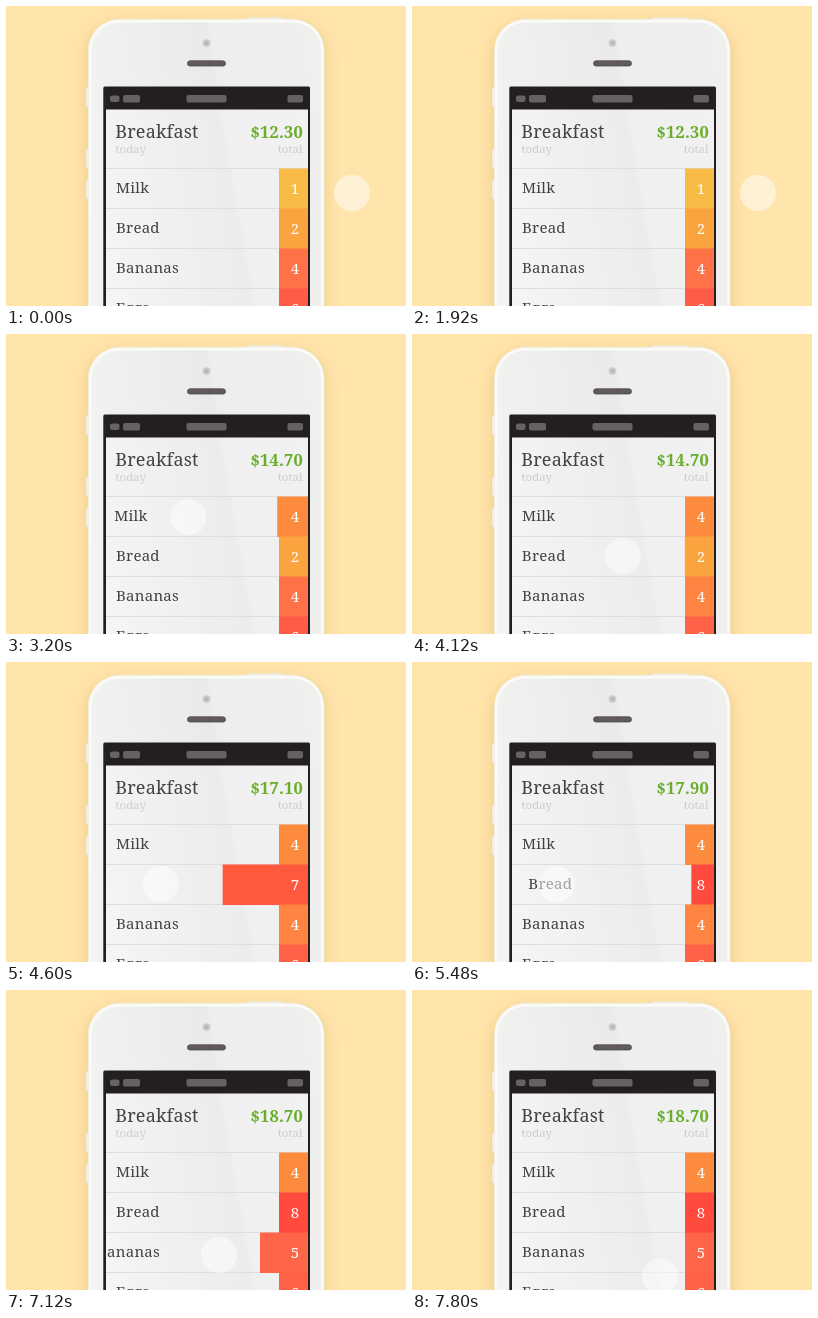
An HTML page for the animation above (8000 ms loop, 400 by 300 pixels).

```html
<!DOCTYPE html>
<html lang="en">
<head>
<meta charset="utf-8">
<title>Shopping list</title>
<style>
  html, body { margin: 0; width: 100%; height: 100%; overflow: hidden; background: #ffe4ab; }
  svg { display: block; width: 100vw; height: 100vh; }
  text { font-family: "Noto Serif", serif; font-size: 15px; letter-spacing: .25px; fill: #424242; }
  .title { font-size: 18px; letter-spacing: .15px; }
  .total { font-size: 16.5px; font-weight: 700; fill: #69ae2b; text-anchor: end; }
  .note { font-size: 11.5px; letter-spacing: 0; fill: #cdcdcd; }
  .count { fill: #fff; letter-spacing: 0; text-anchor: middle; }
</style>
</head>
<body>
<svg viewBox="0 0 400 300">
  <defs>
    <linearGradient id="shell" gradientUnits="userSpaceOnUse" x1="82" y1="190" x2="318" y2="149">
      <stop offset="0" stop-color="#f3f3f2"/>
      <stop offset=".6" stop-color="#eaeae9"/>
      <stop offset=".62" stop-color="#eeeeee"/>
      <stop offset="1" stop-color="#efefee"/>
    </linearGradient>
    <linearGradient id="page" gradientUnits="userSpaceOnUse" x1="100" y1="200" x2="302" y2="165">
      <stop offset="0" stop-color="#f4f4f4"/>
      <stop offset=".62" stop-color="#ececec"/>
      <stop offset=".64" stop-color="#f0f0f0"/>
      <stop offset="1" stop-color="#f1f1f1"/>
    </linearGradient>
    <filter id="blur" x="-20%" y="-20%" width="140%" height="140%"><feGaussianBlur stdDeviation="7"/></filter>
    <clipPath id="screen"><rect x="99.5" y="103" width="202.5" height="197"/></clipPath>
  </defs>

  <rect width="400" height="300" fill="#ffe4ab"/>
  <rect x="80" y="17" width="240" height="360" rx="32" fill="#d9ab5c" opacity=".4" filter="url(#blur)"/>
  <g fill="#f3f0ea" stroke="#e2dccf" stroke-width=".5">
    <rect x="80" y="81" width="5" height="20" rx="1.5"/>
    <rect x="80" y="143" width="5" height="19" rx="1.5"/>
    <rect x="80" y="174" width="5" height="19" rx="1.5"/>
    <rect x="240" y="11.5" width="37" height="5" rx="1.5"/>
  </g>
  <rect x="82.3" y="13.3" width="235.8" height="380" rx="31" fill="#fafaf8" stroke="#ece7dc" stroke-width=".6"/>
  <rect x="85.5" y="16.5" width="229.5" height="380" rx="28" fill="url(#shell)"/>
  <circle cx="200.5" cy="37" r="3.8" fill="#c9c9c9"/>
  <circle cx="200.5" cy="37" r="1.8" fill="#b5b5b8"/>
  <rect x="181.5" y="54.8" width="38" height="5.2" rx="2.6" fill="#615c5b" stroke="#4c4848" stroke-width=".8"/>

  <rect x="97.3" y="80.5" width="206.7" height="230" rx="1.5" fill="#231f20"/>
  <g fill="#676262">
    <rect x="104" y="89.5" width="9.5" height="6.5" rx="2"/>
    <rect x="117" y="89" width="17" height="7.5" rx="2"/>
    <rect x="180.5" y="89" width="40" height="7.5" rx="2"/>
    <rect x="281.5" y="89" width="15.5" height="7.5" rx="2"/>
  </g>
  <rect x="100" y="103.5" width="202" height="197" fill="url(#page)"/>
  <text class="title" x="109.3" y="132">Breakfast</text>
  <text class="note" x="109.5" y="147">today</text>
  <text class="total" id="total" x="297" y="132"></text>
  <text class="note" x="296.5" y="147" text-anchor="end">total</text>
  <g id="list" clip-path="url(#screen)"></g>
  <circle id="finger" r="18" fill="#fff" opacity=".5"/>
</svg>
<script>
const LOOP = 8000, ROW_TOP = 163, ROW_HEIGHT = 40, BAR_LEFT = 273, SCREEN_RIGHT = 302;
const UNIT_DRAG = 11, UNIT_PRICE = 0.8, START_TOTAL = 12.3;

// grab: finger x where the row starts to follow; down/up: touch times; free: units that cost nothing
const rows = [
  { name: "Milk", count: 1, from: [248, 187, 69], to: [253, 139, 62], grab: 218, down: 1880, up: 3120, free: 0 },
  { name: "Bread", count: 2, from: [251, 164, 63], to: [255, 74, 61], grab: 211, down: 4120, up: 5320, free: 2 },
  { name: "Bananas", count: 4, from: [255, 114, 72], drift: [255, 131, 65], to: [255, 101, 72], grab: 232, down: 6440, up: 7160, free: 0 },
  { name: "Eggs", count: 6, from: [255, 92, 72], drift: [255, 98, 71] },
];

const clamp = v => Math.min(1, Math.max(0, v));
const lerp = (a, b, p) => a + (b - a) * p;
const mix = (a, b, p) => a.map((v, i) => lerp(v, b[i], p));
const easeOut = p => 1 - (1 - p) ** 2;
const easeInOut = p => p < 0.5 ? 4 * p ** 3 : 1 - 4 * (1 - p) ** 3;

const moves = [
  { start: 1880, end: 2880, to: [182, 183], ease: easeInOut },
  { start: 3120, end: 3920, to: [211, 222], ease: easeInOut },
  { start: 4120, end: 4920, to: [144, 222], ease: easeOut },
  { start: 5400, end: 6000, to: [232, 264], ease: easeInOut },
  { start: 6440, end: 7040, to: [213, 265], ease: easeOut },
  { start: 7240, end: 7800, to: [248, 287], ease: easeInOut },
];

function fingerAt(t) {
  return moves.reduce((pos, m) =>
    mix(pos, m.to, m.ease(clamp((t - m.start) / (m.end - m.start)))), [346, 187]);
}

const pulled = (row, t) => Math.max(0, row.grab - fingerAt(t)[0]);
const unitsAt = (row, t) => Math.floor(pulled(row, t) / UNIT_DRAG);

function rowState(row, t) {
  const base = row.drift ? mix(row.from, row.drift, clamp((t - 3240) / 400)) : row.from;
  if (!row.grab || t < row.down) return { offset: 0, units: 0, color: base };
  const held = Math.min(t, row.up), since = t - held;
  const spring = Math.exp(-since / 70) * Math.cos(Math.PI / 2 * since / 90);
  const units = unitsAt(row, held);
  return { offset: pulled(row, held) * spring, units, color: mix(base, row.to, units / unitsAt(row, row.up)) };
}

function add(tag, attrs, text = "") {
  const el = document.createElementNS("http://www.w3.org/2000/svg", tag);
  for (const key in attrs) el.setAttribute(key, attrs[key]);
  el.textContent = text;
  return list.appendChild(el);
}

const list = document.getElementById("list");
const total = document.getElementById("total");
const finger = document.getElementById("finger");

rows.forEach((row, i) => {
  const y = ROW_TOP + i * ROW_HEIGHT;
  add("rect", { x: 100, y: y - 1, width: 202, height: 1, fill: "#dedede" });
  row.label = add("text", { y: y + 24 }, row.name);
  row.bar = add("rect", { y: y - 0.5, height: ROW_HEIGHT + 0.5 });
  row.number = add("text", { class: "count", x: 289, y: y + 24.5 });
});
// Bars stay above the separators of the rows below them.
rows.forEach(row => list.append(row.bar, row.number));

function draw(t) {
  let sum = START_TOTAL;
  for (const row of rows) {
    const { offset, units, color } = rowState(row, t);
    const left = BAR_LEFT - offset;
    row.label.setAttribute("x", 110 - offset);
    row.bar.setAttribute("x", left);
    row.bar.setAttribute("width", SCREEN_RIGHT - left);
    row.bar.setAttribute("fill", `rgb(${color.map(Math.round)})`);
    row.number.textContent = row.count + units;
    sum += UNIT_PRICE * Math.max(0, units - row.free || 0);
  }
  total.textContent = "$" + sum.toFixed(2);
  const [x, y] = fingerAt(t);
  finger.setAttribute("cx", x);
  finger.setAttribute("cy", y);
}

const began = performance.now();
function tick() {
  draw((performance.now() - began) % LOOP);
  requestAnimationFrame(tick);
}
tick();
</script>
</body>
</html>
```
